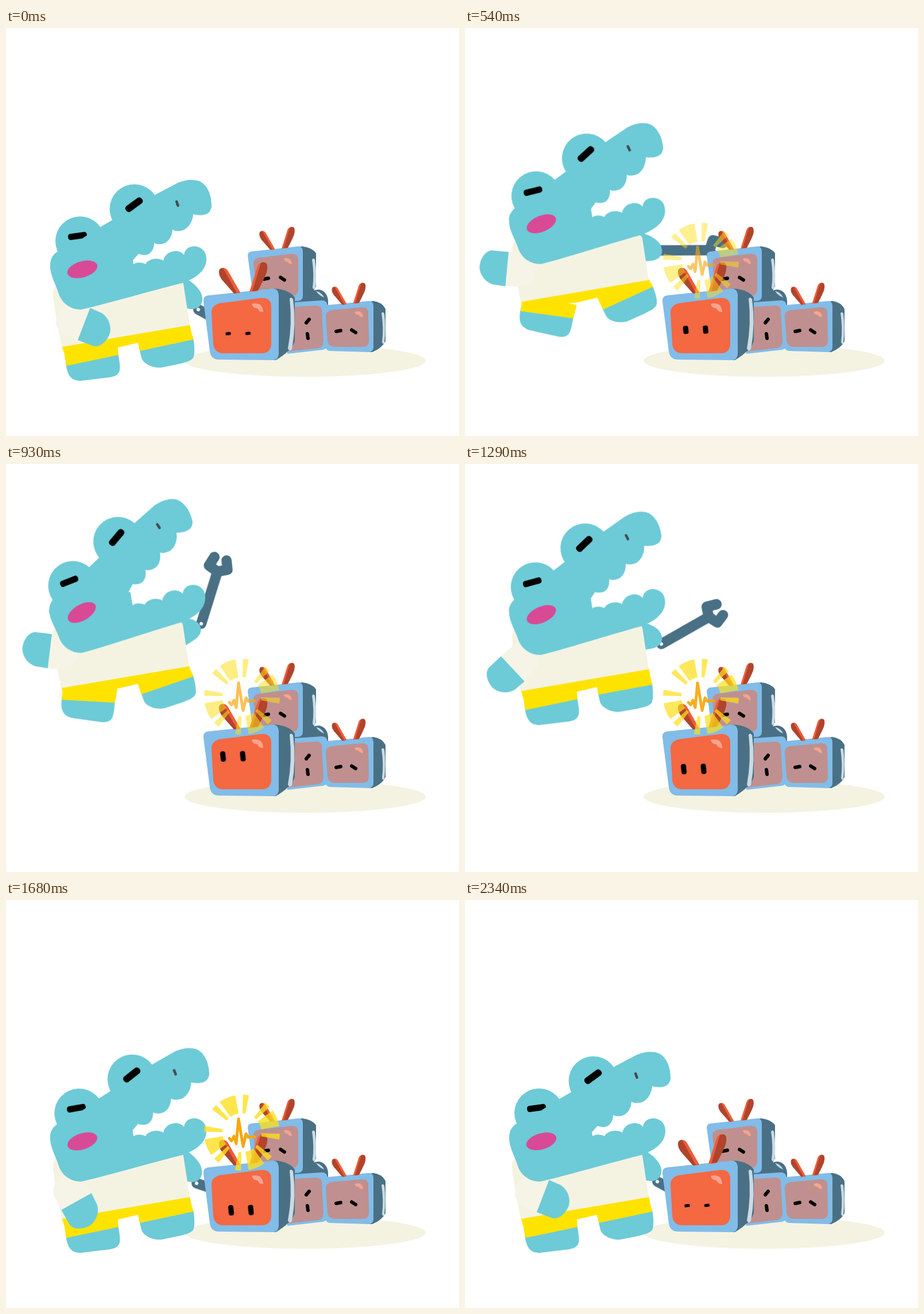
Write an HTML page that moves like this. It is 789 px wide and 710 px high and loops after 2.43 s.

```html
<!DOCTYPE html>
<html lang="en">
<head>
<meta charset="utf-8">
<title>Jumping crocodile</title>
<style>
html, body { margin: 0; width: 100%; height: 100%; overflow: hidden; background: #fff; }
svg { display: block; width: 100vw; height: 100vh; }

.body, .head, .skull, .arm, .hand, .wrench, .legL, .legR, .eyes, .eye, .spark {
  animation: 2430ms linear infinite;
}
.body { animation-name: body; }
.head { animation-name: head; transform-origin: 133px 420px; }
.skull { animation-name: skull; transform-origin: 133px 420px; }
.arm { animation-name: arm; }
.hand { animation-name: hand; transform-origin: 302px 465px; }
.wrench { animation-name: wrench; }
.legL { animation-name: legL; transform-origin: 150px 555px; }
.legR { animation-name: legR; transform-origin: 266px 532px; }
.eyes { animation-name: eyes; }
.eye { animation-name: blink; }
.spark { animation-name: spark; }

@keyframes body {
  0%, 66.7%, 100% { transform: translate(0, 0); }
  6.2% { transform: translate(0, -7px); }
  14.8% { transform: translate(0, -38px); }
  22.2% { transform: translate(0, -78px); }
  28.4% { transform: translate(-1px, -115px); }
  38.3% { transform: translate(-1px, -165px); }
  45.7% { transform: translate(-1px, -176px); }
  53.1% { transform: translate(0, -160px); }
  59.7% { transform: translate(0, -104px); }
}
@keyframes head {
  0%, 66.7%, 100% { transform: translate(0, 0) rotate(0deg); }
  6.2% { transform: translate(0, -9px) rotate(1.5deg); }
  14.8% { transform: translate(-1px, -42px) rotate(4deg); }
  22.2% { transform: translate(0, -79px) rotate(-1.5deg); }
  28.4% { transform: translate(0, -110px) rotate(-4.9deg); }
  38.3% { transform: translate(-1px, -161.5px) rotate(-2.4deg); }
  45.7% { transform: translate(-1px, -173px) rotate(-2deg); }
  53.1% { transform: translate(0, -158px) rotate(-1.3deg); }
  59.7% { transform: translate(0, -103px) rotate(-.6deg); }
}
/* turns on top of .head */
@keyframes skull {
  0%, 88.9%, 100% { transform: rotate(0deg); }
  6.2% { transform: rotate(2.5deg); }
  14.8% { transform: rotate(6.1deg); }
  22.2% { transform: rotate(-4.5deg); }
  28.4% { transform: rotate(-8.9deg); }
  38.3% { transform: rotate(-11.3deg); }
  45.7% { transform: rotate(-10deg); }
  53.1% { transform: rotate(-6.1deg); }
  66.7% { transform: rotate(-2.8deg); }
  69.1% { transform: rotate(-2deg); }
}
@keyframes arm {
  0%, 88.9%, 100% { transform: translate(104px, 503px) rotate(21deg); }
  14.8% { transform: translate(105px, 501px) rotate(26.5deg); }
  22.2% { transform: translate(107px, 501px) rotate(185deg); }
  28.4% { transform: translate(109px, 502px) rotate(214deg); }
  38.3% { transform: translate(111px, 495px) rotate(187deg); }
  53.1% { transform: translate(108px, 493px) rotate(137deg); }
  69.1% { transform: translate(106px, 495px) rotate(61deg); }
}
@keyframes hand {
  0%, 88.9%, 100% { transform: rotate(0deg); }
  14.8% { transform: rotate(25deg); }
  28.4% { transform: rotate(-48deg); }
  38.3% { transform: rotate(-45deg); }
  53.1% { transform: rotate(-22deg); }
  69.1% { transform: rotate(5deg); }
}
@keyframes wrench {
  0%, 88.9%, 100% { transform: translate(335px, 490px) rotate(27deg); }
  14.8% { transform: translate(319px, 500px) rotate(66deg); }
  28.4% { transform: translate(341px, 437px) rotate(-57deg); }
  38.3% { transform: translate(341px, 443px) rotate(-74deg); }
  53.1% { transform: translate(342px, 473px) rotate(-31deg); }
  69.1% { transform: translate(332px, 493px) rotate(17deg); }
}
@keyframes legL {
  0%, 53.1%, 100% { transform: rotate(0deg); }
  14.8% { transform: rotate(18deg); }
  28.4% { transform: rotate(21deg); }
  38.3% { transform: rotate(15deg); }
}
@keyframes legR {
  0%, 60%, 100% { transform: rotate(0deg); }
  14.8% { transform: rotate(-11deg); }
  28.4% { transform: rotate(-14deg); }
  38.3% { transform: rotate(-7deg); }
  53.1% { transform: rotate(1.5deg); }
}
@keyframes eyes {
  0%, 14.8%, 96.3%, 100% { transform: translate(387px, 532px); }
  28.4% { transform: translate(382.5px, 520px); }
  38.3% { transform: translate(378px, 509px); }
  53.1% { transform: translate(381px, 531px); }
  69.1%, 84% { transform: translate(392px, 540px); }
}
@keyframes blink {
  0%, 96.3%, 100% { transform: rotate(-6deg) scaleY(.3); }
  14.8% { transform: rotate(-6deg) scaleY(.57); }
  28.4%, 84% { transform: rotate(-6deg) scaleY(1); }
}
@keyframes spark {
  0%, 96.3%, 100% { opacity: 0; }
  12.3%, 14.8% { opacity: .9; }
  28.4% { opacity: .4; }
  38.3% { opacity: .7; }
  53.1% { opacity: .92; }
  69.1%, 80% { opacity: 1; }
}

.skin { fill: #6dcad7; }
.cloth { fill: #f4f3e2; }
.pants { fill: #ffe300; }
.frame { fill: #82bce8; }
.side { fill: #4a7085; }
.dull { fill: #bf908f; }
.shine { fill: #f6a48d; }
.gleam { fill: #c9dbe5; }
.red { fill: #ee5d38; }
.rust { fill: #b0442c; }
.ink { fill: none; stroke: #000; stroke-width: 6; stroke-linecap: round; }
.tool { fill: none; stroke: #4a7085; stroke-width: 18; stroke-linecap: round; stroke-linejoin: round; }
</style>
</head>
<body>
<svg viewBox="0 0 789 710">
  <defs>
    <g id="antennas">
      <path class="rust" d="M371 424C371 416 381 415 386 423L407 461L397 462L376 438C372 432 371 429 371 424Z"/>
      <path class="red" d="M378 417.500Q384 417 388 425L408 460L402 461Z"/>
      <path class="red" d="M424 459L438 415C441 407 450 406 454 410L446 440L437 458Z"/>
      <path class="rust" d="M444 409C455 404 457 414 454 425Q453 430 439 457L429 458Z"/>
    </g>
  </defs>

  <ellipse class="cloth" cx="521" cy="579" rx="210" ry="28"/>

  <g class="body">
    <g class="wrench">
      <path class="tool" d="M0 0L92 2M118 -10L101 -15L95 2L103 18L118 12"/>
      <circle r="3" fill="#fff"/>
    </g>
    <path class="hand skin" d="M288 440L313 436C328 444 344 459 342 474C340 488 328 491 315 488L288 482Z"/>
    <g class="legL">
      <path class="skin" d="M104 583L195 566C198 580 199 590 198 596C196 604 188 607 180 608L130 614C114 614 107 606 104 583Z"/>
      <path class="pants" d="M100 558L194 545L196 569L105 588Z"/>
    </g>
    <g class="legR">
      <path class="skin" d="M232 558L326 540C329 555 329 568 326 574C322 580 312 582 300 585L270 591C255 592 239 584 236 574Z"/>
      <path class="pants" d="M228 540L320 522L327 542L233 562Z"/>
    </g>
    <path class="pants" d="M97 552L320 515L323 530L229 548L195 556L101 566Z"/>
    <path class="cloth" d="M90 448Q81 452 82 465Q84 490 97 555L320 517L309 445Q307 438 302 438L110 446Z"/>
    <g class="arm">
      <path class="skin" d="M32 -30L55 -29C69 -27 81 -14 82 0C82 14 75 28 63 30L32 30Z"/>
      <path fill="#f5f4e6" d="M34 -30L6 -28C-10 -24 -15 -12 -15 2C-15 16 -8 26 6 29L34 30Z"/>
    </g>
  </g>

  <g class="head">
    <path class="skin" d="M77 412C76 430 88 448 92 463C97 478 112 490 130 490C150 487 250 458 310 443C335 433 349 420 349 402C349 386 337 380 328 380C318 380 311 386 310 395C306 389 297 387 290 389C281 391 275 398 274 405C268 400 250 399 243 411C237 408 229 407 222 411L219 388L110 380C92 386 78 396 77 412Z"/>
    <g class="skull">
      <path class="skin" d="M78 405C82 390 95 386 110 380L165 346L262 289L300 269C318 262 336 262 346 273C356 285 358 298 358 311C356 325 343 328 326 324C325 340 314 353 302 353Q295 354 290 351C289 365 281 375 270 376Q263 377 258 374C258 388 249 396 240 395Q235 395 231 393L221 404C200 440 150 470 112 475C90 460 77 435 78 405Z"/>
      <circle class="skin" cx="129" cy="371" r="43"/>
      <circle class="skin" cx="223.500" cy="315" r="43"/>
      <rect x="108" y="356.500" width="33" height="11" rx="4.500" transform="rotate(-8 124.500 362)"/>
      <rect x="206" y="301.500" width="34" height="12" rx="5" transform="rotate(-36 223 307.500)"/>
      <path d="M297 302L299.500 309" fill="none" stroke="#444b4e" stroke-width="4.500" stroke-linecap="round"/>
      <ellipse cx="133" cy="420" rx="27" ry="14" fill="#d84a96" transform="rotate(-16 133 420)"/>
    </g>
    <path class="skin" d="M126 371L140 361.500L153 354L153 374L128 381Z"/>
  </g>

  <g>
    <path class="side" d="M500 477L535 457Q548 452 556 461Q562 468 561 482L500 490Z"/>
    <path class="gleam" d="M540 458Q549 459 554 469Q546 466 540 458Z"/>
    <path class="frame" d="M490 478L550 474Q559 474 560 483L560 551Q560 558 552 560L490 567Z"/>
    <path class="dull" d="M490 486L540 483Q549 483 550 491L553 545Q552 555 544 557L490 563Z"/>
    <path class="ink" d="M523 513L528 507M525 532L526 540"/>
  </g>

  <g>
    <path class="side" d="M500 382L516 380Q533 382 540 392L540 450Q534 464 514 475L500 474Z"/>
    <path class="gleam" d="M533 403Q536 399 538 403Q542 428 539 453Q536 457 534 452Q537 428 533 403Z"/>
    <path class="frame" d="M421 396Q421 390 427 389L509 380Q517 380 517 389L517 466Q517 474 509 475L440 472Q432 471 430 463Z"/>
    <path class="dull" d="M431 410Q431 402 439 400L497 393Q509 392 509 403L509 454Q509 466 498 466L447 466Q437 465 436 456Z"/>
    <path class="shine" d="M484 401Q497 398 498 411Q493 411 491 407Q484 406 484 401Z"/>
    <use href="#antennas" transform="translate(170.500 46.500) scale(.73 .735)"/>
    <path class="ink" d="M449 437L457 435.500M478 434L485 438.500"/>
  </g>

  <g>
    <path class="side" d="M625 477L640 475Q655 477 661 489L661 545Q655 557 638 564L625 563Z"/>
    <path class="gleam" d="M654 496Q657 493 659 497Q662 522 659 548Q657 552 655 547Q658 522 654 496Z"/>
    <path class="frame" d="M555 489Q555 483 561 482L632 475Q640 475 640 484L640 555Q640 563 632 564L565 562Q557 562 556 553Z"/>
    <path class="dull" d="M557 502Q557 493 566 491L620 486Q631 485 631 496L632 545Q632 554 622 555L571 555Q562 554 560 545Z"/>
    <path class="shine" d="M607 494Q621 490 622 503Q616 503 614 499Q608 499 607 494Z"/>
    <use href="#antennas" transform="translate(309 156) scale(.697 .705)"/>
    <path class="ink" d="M575 528L583 526.500M602 525.500L609 530"/>
  </g>

  <g>
    <path class="side" d="M450 455L470 453.500Q494 456 503 469L503 545Q497 562 470 578L450 577Z"/>
    <path class="gleam" d="M494 471Q497 467 500 472Q506 515 498 559Q494 564 491 558Q499 515 494 471Z"/>
    <path class="frame" d="M344 476Q343 467 351 465.500L464 453.500Q474 453 475 464L475 568Q474 578 464 578L369 577Q357 576 355 563Z"/>
    <path fill="#f46842" d="M358 497Q357 483 372 479L443 470Q461 468 462 484L462 550Q461 565 447 566L377 566Q363 565 361 550Z"/>
    <path class="shine" d="M428 480Q447 476 448 494Q441 495 438 488Q429 487 428 480Z"/>
    <use href="#antennas"/>
    <g class="eyes">
      <rect class="eye" x="-4.500" y="-9" width="9" height="18" rx="4"/>
      <g transform="translate(34.500 -.5)"><rect class="eye" x="-4.500" y="-9" width="9" height="18" rx="4"/></g>
    </g>
  </g>

  <g class="spark" fill="none">
    <circle cx="411" cy="405" r="50" stroke="#fddf1c" stroke-opacity=".78" stroke-width="32" pathLength="360" stroke-dasharray="26 11.500 9 27.500 9 7" transform="rotate(-126 411 405)"/>
    <path d="M389 415L393 419L397 411L401 424L405 381L413 429L418 407L422 413L433 412" stroke="#f6a70f" stroke-width="5" stroke-linecap="round" stroke-linejoin="round"/>
  </g>
</svg>
</body>
</html>
```
